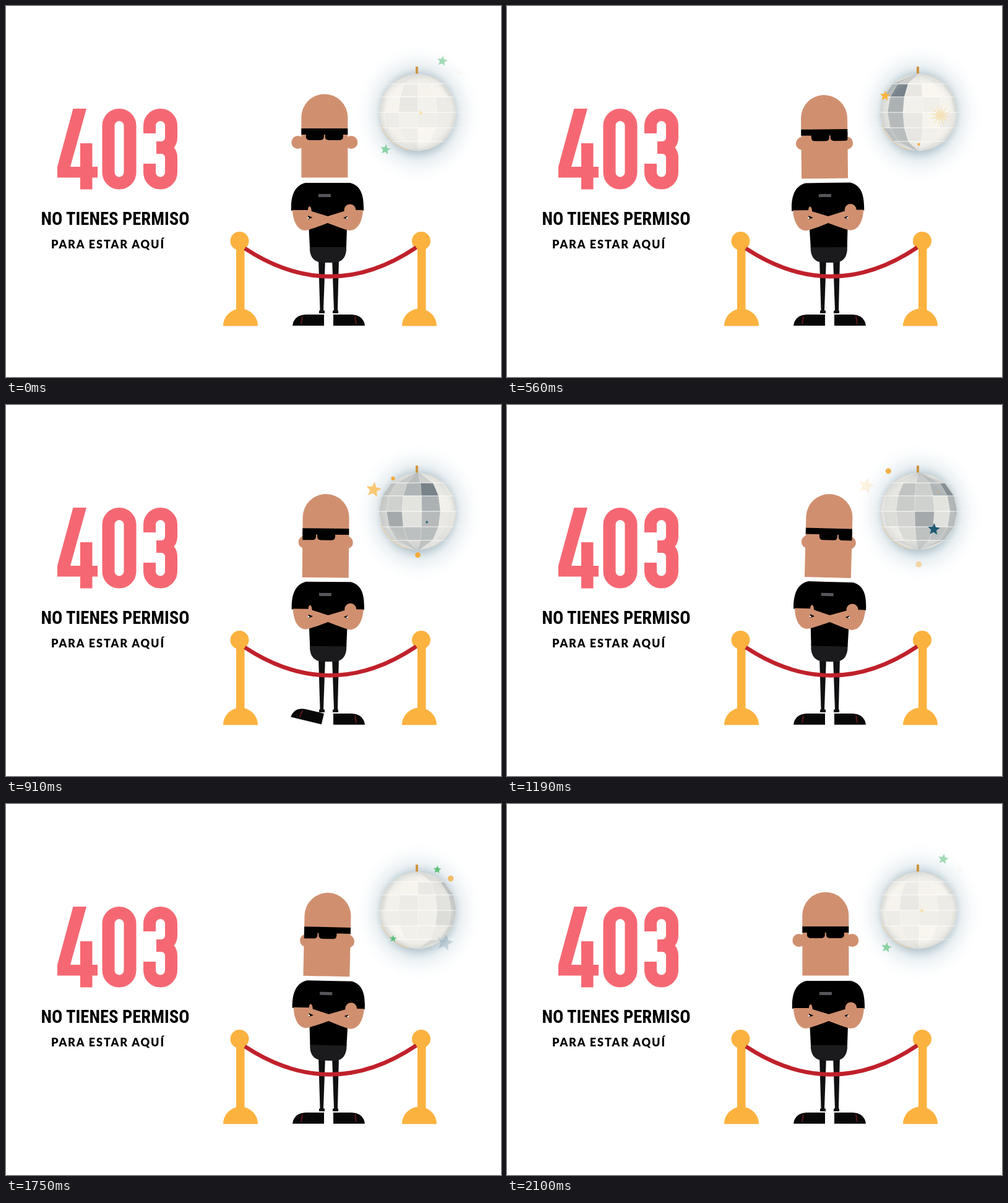
These frames come from a looping animation (800 px wide and 600 px high, 2170 ms). An HTML page:

```html
<!DOCTYPE html>
<html lang="es">
<head>
<meta charset="utf-8">
<title>403</title>
<style>
  html, body { margin: 0; width: 100%; height: 100%; overflow: hidden; background: #fff; }
  svg { display: block; width: 800px; height: 600px; }
  #line1 { font: 600 29.5px "Roboto Condensed", Roboto, sans-serif; font-stretch: condensed; }
  #line2 { font: 900 18px Lato, sans-serif; }
</style>
</head>
<body>
<svg viewBox="0 0 800 600">
  <defs>
    <radialGradient id="glow">
      <stop offset=".54" stop-color="#8ba6b3" stop-opacity=".62"/>
      <stop offset=".68" stop-color="#abc2cd" stop-opacity=".26"/>
      <stop offset=".85" stop-color="#cfdee6" stop-opacity=".12"/>
      <stop offset="1" stop-color="#e4eef4" stop-opacity="0"/>
    </radialGradient>
    <radialGradient id="shade">
      <stop offset=".75" stop-color="#f4f0e6" stop-opacity="0"/>
      <stop offset="1" stop-color="#9aa5aa" stop-opacity=".35"/>
    </radialGradient>
    <clipPath id="ballClip"><circle cx="665.5" cy="172" r="62.5"/></clipPath>
    <path id="skull" d="M477.5 277.5V180a37.5 37.5 0 0 1 75 0v97.5z"/>
    <clipPath id="skullClip"><use href="#skull"/></clipPath>
    <path id="rims" d="M612 126H718M590 147H738M588 172H745M590 197H742M610 219H722" stroke="#fff"/>
    <g id="shoe">
      <path d="M514 499H484Q465 500 463 517H514z" fill="#080809"/>
      <path d="M479 502l-2 12" stroke="#5c1a1c" stroke-width="2"/>
    </g>
  </defs>

  <!-- Numerals -->
  <g role="img" aria-label="403" fill="none" stroke="#f56873" stroke-width="20">
    <path d="M108.500 166H130L104 260H120V222H139.500V260H148V277.500H139.500V296.500H120V277.500H83V260z" fill="#f56873" stroke="none"/>
    <rect x="165.500" y="176" width="35" height="110.500" rx="17.500"/>
    <path d="M232 206V193.500a17.500 17.500 0 0 1 35 0V213A16 16 0 0 1 251 229H243M251 229A16 16 0 0 1 267 245V269a17.500 17.500 0 0 1-35 0V255"/>
  </g>
  <text id="line1" x="56.500" y="353.500">NO TIENES PERMISO</text>
  <text id="line2" x="73" y="392">PARA ESTAR AQUÍ</text>

  <!-- Mirror ball -->
  <ellipse cx="666" cy="174" rx="102" ry="112" fill="url(#glow)"/>
  <path d="M664 98V110" stroke="#cf9440" stroke-width="4"/>
  <use href="#rims" opacity=".3"/>
  <g clip-path="url(#ballClip)">
    <g id="tiles"></g>
    <circle cx="665.500" cy="172" r="63" fill="url(#shade)"/>
    <use href="#rims" opacity=".75"/>
  </g>
  <path d="M606 193A62.500 62.500 0 0 0 651 233" fill="none" stroke="#f3c88b" stroke-opacity=".6" stroke-width="1.500"/>
  <g id="sparks"></g>

  <!-- Doorman -->
  <g fill="#101012">
    <path d="M505 408H516L513 492L515 493V497H506V493L507.500 492zM527 408H538L536 492L537 493V497H528V493L530 492z"/>
    <use id="foot" href="#shoe"/>
    <use href="#shoe" transform="matrix(-1 0 0 1 1043 0)"/>
  </g>
  <g id="upper">
    <path d="M491 388H550V395Q548 415 529 415H513Q493 415 491 395z" fill="#1b1a1d"/>
    <path d="M484 286H556C572 290 579 303 578 331H552L550 390H491L488 331H461C460 304 468 290 484 286z"/>
    <rect x="505" y="304" width="20" height="5" fill="#55565a"/>
    <g fill="#d09070">
      <path d="M463 330H488Q488 324 491.500 324Q494 327 494 332L520 340L546 332L551 330H577C576 350 568 363 555 363C548 362 520 351 520 351S492 362 484 363C472 363 464 350 463 330z"/>
      <circle cx="556" cy="330" r="9.500"/>
    </g>
    <path d="M488 339L495.500 342L488 345zM551.500 340L545 342.500L551.500 345z"/>
    <path d="M487.500 340.500v4l3-1.500zM552 341v4l-3-2z" fill="#fff"/>
    <g id="head">
      <g fill="#d09070">
        <circle id="earL" cy="220.500" r="10.500"/>
        <circle id="earR" cy="220.500" r="10.500"/>
        <use href="#skull"/>
      </g>
      <g clip-path="url(#skullClip)">
        <path d="M470 198H560V208H470z"/>
        <path id="lenses" d="M485 203H514V211Q514 217 508 217H491Q485 217 485 211zM516 203H545V211Q545 217 539 217H522Q516 217 516 211z"/>
      </g>
    </g>
  </g>

  <!-- Barrier -->
  <g fill="#fcb23f">
    <path d="M372 380H385.500V500H372zM351 517.500a28 28 0 0 1 56 0zM665 380H678.500V500H665zM640 517.500a28 28 0 0 1 56 0z"/>
    <circle cx="377.500" cy="380" r="15"/>
    <circle cx="671" cy="380" r="15"/>
  </g>
  <path d="M386 392Q525 483.500 663 390.500" fill="none" stroke="#c0212b" stroke-width="6.500"/>
</svg>

<script>
const LOOP = 2170, STEP = 70, CYCLE = LOOP - STEP;
const { sin, cos, sqrt, abs, max, min, floor, round, PI } = Math;
const el = id => document.getElementById(id);
const clamp = v => max(0, min(1, v));
const rad = deg => deg * PI / 180;
const move = (id, transform) => el(id).setAttribute('transform', transform);
const hash = (a, b) => { const v = sin(a * 12.9898 + b * 78.233) * 43758.5453; return v - floor(v); };

// Tracks a line out to its measure, or lowers its size when it is too long.
function fit(id, width) {
  const text = el(id), size = parseFloat(getComputedStyle(text).fontSize);
  const natural = text.getComputedTextLength();
  if (natural > width) text.style.fontSize = size * width / natural + 'px';
  else text.style.letterSpacing = (width - natural) / (text.textContent.length - 1) + 'px';
}

function drawMan(t) {
  const w = 2 * PI * t / CYCLE;
  const sway = .5 + 1.3 * cos(w - rad(245));
  const turn = .3 * sin(w) + .85 * sin(2 * w) - .5 * sin(3 * w);
  const tap = 14.5 * max(0, cos(4 * w - rad(252))) ** 3;
  const bob = 1.6 * sqrt(abs(sin(w / 2)));
  const ear = 43 - 9.5 * sqrt(abs(turn));
  move('upper', `rotate(${sway} 520 410)`);
  move('head', `translate(0 ${bob})`);
  move('lenses', `translate(${15 * turn} 0)`);
  move('foot', `rotate(${tap} 514 499)`);
  el('earL').setAttribute('cx', 515 - ear);
  el('earR').setAttribute('cx', 515 + ear);
}

const CX = 665.5, CY = 172, R = 62.5, COLS = 12, WIDTH = 360 / COLS;
const rows = [-62.4, -46, -25, 0, 25, 47, 62.4];
const darkTile = { row: 1, col: 7 };

// One side of the ball is mostly grey, the other mostly cream.
function tileColour(row, col) {
  const back = clamp(-1.3 * cos(rad((col + .5) * WIDTH)));
  const grain = .35 * hash(9, col) + .65 * hash(row, col);
  const dark = row === darkTile.row && col === darkTile.col;
  const grey = dark ? 1.4 : .2 * hash(row + 3, col) + back * (.1 + .8 * grain);
  const mix = (a, b) => round(a + (b - a) * grey);
  return `rgb(${mix(252, 157)},${mix(249, 164)},${mix(242, 167)})`;
}

function drawBall(t) {
  const spin = 360 * t / CYCLE;
  let out = `<circle cx="${CX}" cy="${CY}" r="${R}" fill="#f3f0e8"/>`;
  for (let row = 0; row < rows.length - 1; row++) {
    for (let col = 0; col < COLS; col++) {
      const mid = ((col + .5) * WIDTH + spin + 180) % 360 - 180;
      if (abs(mid) > 90 + WIDTH / 2) continue;
      const point = (side, y) => {
        const a = max(-90, min(90, mid + side * WIDTH / 2));
        return (CX + sqrt(R * R - y * y) * sin(rad(a))).toFixed(1) + ',' + (CY + y);
      };
      const top = rows[row], low = rows[row + 1];
      out += `<polygon points="${point(-1, top)} ${point(1, top)} ${point(1, low)} ${point(-1, low)}"
        fill="${tileColour(row, col)}" stroke="#fff" stroke-opacity=".3" stroke-width=".7"/>`;
    }
  }
  el('tiles').innerHTML = out;
}

const green = { points: 5, size: 9, colour: '#5fc17d' };
const amber = { points: 5, size: 13.5, colour: '#fab53e' };
const teal = { points: 5, size: 14, colour: '#1f5a73' };
const burst = { points: 12, size: 20, colour: '#f6dfa6' };
const dot = { points: 0, size: 5, colour: '#f4a936' };

// Sparks fly straight out from the ball: look, heading, birth, first distance
const sparks = [
  [green, -64.5, 1380, 53], [green, 131, 1440, 44], [amber, 206, 270, 45], [teal, 50, 840, 19],
  [dot, 233, 640, 52], [dot, 90, 400, 43], [dot, -44, 1120, 40], [burst, 8, 2010, 0]
];
const LIFE = 1000, SPEED = .054;

function shape(points, x, y, r, tilt) {
  if (!points) return `<circle cx="${x}" cy="${y}" r="${r}"`;
  const inner = points > 5 ? .3 : .45;
  let list = '';
  for (let i = 0; i < 2 * points; i++) {
    const a = PI * i / points - PI / 2 + tilt, d = i % 2 ? r * inner : r;
    list += `${(x + d * cos(a)).toFixed(1)},${(y + d * sin(a)).toFixed(1)} `;
  }
  return `<polygon points="${list}"`;
}

function drawSparks(t) {
  el('sparks').innerHTML = sparks.map(([look, heading, birth, start]) => {
    const age = (t - birth + CYCLE) % CYCLE, u = age / LIFE;
    if (u >= 1) return '';
    const d = start + SPEED * age, a = rad(heading), r = look.size * (1 - (1 - u) ** 3);
    return shape(look.points, CX + d * cos(a), CY + d * sin(a), r, .25 * u) +
      ` fill="${look.colour}" opacity="${clamp(2 * (1 - u))}"/>`;
  }).join('');
}

let shown = -1;
function frame() {
  const step = floor(performance.now() % LOOP / STEP);
  if (step !== shown) {
    shown = step;
    const t = step * STEP || CYCLE; // the loop opens on its closing pose
    drawMan(t);
    drawBall(t);
    drawSparks(t);
  }
  requestAnimationFrame(frame);
}

fit('line1', 240);
fit('line2', 182);
frame();
</script>
</body>
</html>
```
